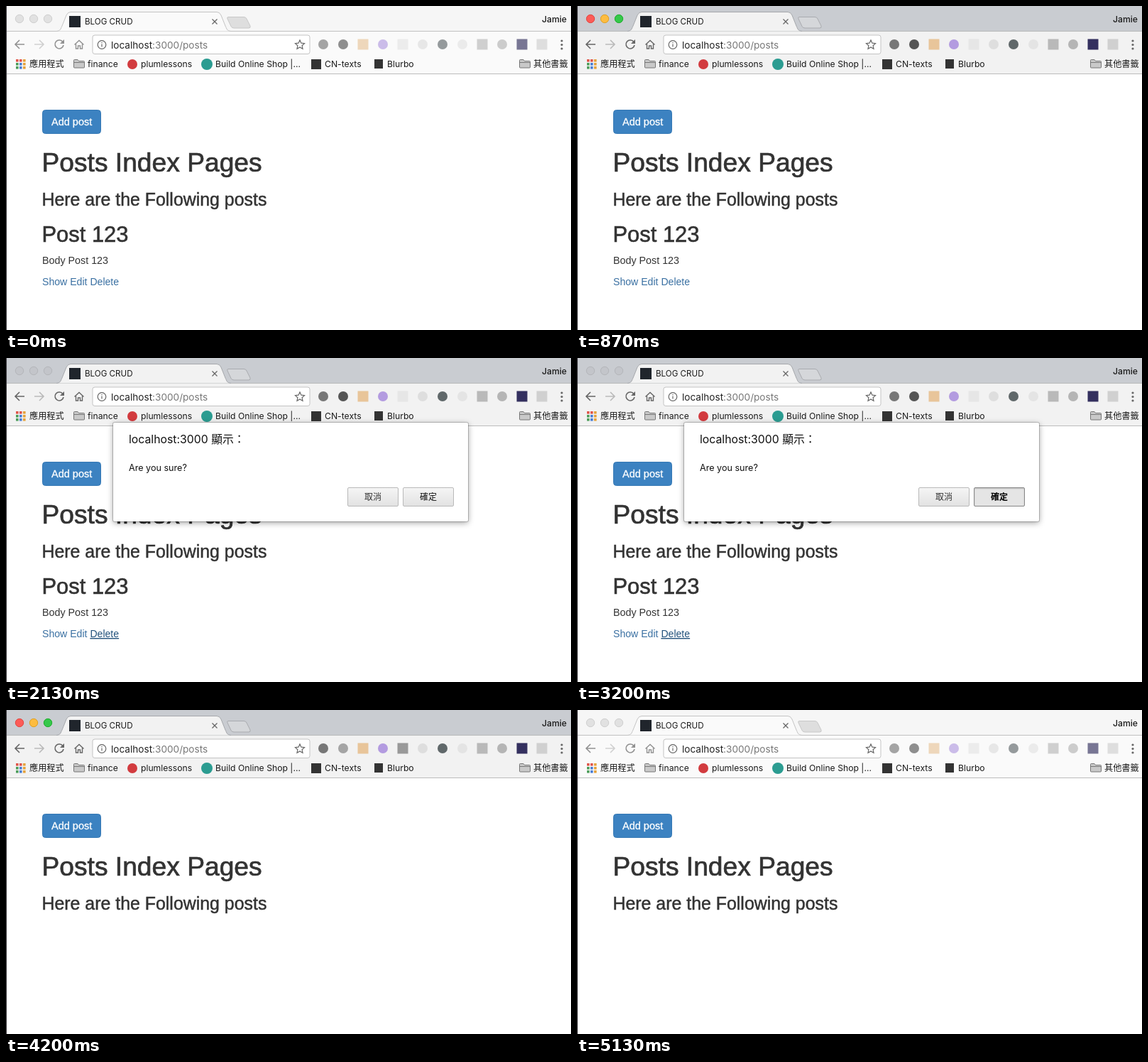
An HTML page for the animation above (5.19 s loop, 796 by 456 pixels).

```html
<!DOCTYPE html>
<html lang="zh-Hant">
<head>
<meta charset="utf-8">
<title>BLOG CRUD</title>
<style>
html, body { margin: 0; width: 100%; height: 100%; overflow: hidden; background: #fff; }
#stage {
  position: relative; width: 796px; height: 456px; overflow: hidden;
  font-family: Inter, "Noto Sans CJK TC", "Noto Sans CJK", sans-serif;
}
svg { display: block; }
.ui { font-size: 12.2px; fill: #1a1a1a; }
.page { font-family: "Liberation Sans", Arial, sans-serif; fill: #333; }
.head { stroke: #333; stroke-width: .02em; }
.line { fill: none; stroke: #666; stroke-width: 1.6; }

/* window in the background */
#bar { fill: #f6f6f6; }
#tab, #tools { fill: #fafafa; }
#tab { stroke: #c4c4c4; }
#plus { fill: #dedede; stroke: #c8c8c8; }
#lights circle { fill: #e1e1e1; stroke: #cfcfcf; }
#nav { opacity: .7; }
#exts { opacity: .65; }

/* window in front */
.active #bar { fill: #c9ccd1; }
.active #tab, .active #tools { fill: #f2f2f2; }
.active #tab { stroke: #a6a8ac; }
.active #plus { fill: #d5d7da; stroke: #a9abaf; }
.active #lights circle { fill: #c3c5ca; stroke: #b4b6ba; }
.active #nav, .active #exts { opacity: 1; }
.lit #lights .r { fill: #fc5b57; stroke: #e2463f; }
.lit #lights .y { fill: #fdbc40; stroke: #dfa023; }
.lit #lights .g { fill: #35c84a; stroke: #1dad2b; }

.link { fill: #3a70a2; }
.hover #del { fill: #23527c; text-decoration: underline; }
.gone #post { display: none; }
.loading .dims { opacity: .5; }
.loading .shows { fill: #999; }

#dialog {
  position: absolute; left: 151px; top: 91px; width: 500px; height: 139px;
  background: #fff; border-radius: 2px; color: #111;
  box-shadow: 0 0 0 1px rgba(0,0,0,.2), 0 2px 9px rgba(0,0,0,.38);
  transform-origin: 50% 100%;
}
#dialog span { position: absolute; left: 22px; white-space: nowrap; }
#dialog b {
  position: absolute; top: 91px; width: 70px; height: 25px; line-height: 26px;
  border: 1px solid #b9b9b9; border-radius: 2px; text-align: center;
  font-size: 12px; font-weight: 400; color: #333;
  background: linear-gradient(#f5f5f5, #e2e2e2);
}
#dialog #ok { left: 408px; font-weight: 500; color: #111; }
.pressed #dialog #ok {
  font-weight: 700; color: #000; border-color: #888;
  background: #e5e5e5; box-shadow: inset 0 1px 2px rgba(0,0,0,.2);
}
</style>
</head>
<body>
<div id="stage">
<svg width="796" height="456">
  <rect width="796" height="456" fill="#fff"/>
  <rect id="bar" width="796" height="36"/>
  <rect id="tools" y="36" width="796" height="60"/>
  <path d="M0 95.5H796" stroke="#bcbcbc"/>
  <path d="M0 35.5H796" stroke="#b5b5b5" opacity=".8"/>
  <path id="tab" d="M71 35.5C77 35 77 32 79 28L85 13Q87 8.500 91 8.500H297Q301 8.500 303 13L309 28C311 32 311 35 317 35.5"/>
  <path id="plus" d="M313 15.500H335Q338 15.500 339 18L344 28Q345 31 342 31H321Q318 31 317 28.500L312 18Q311 15.500 313 15.500Z"/>
  <g id="lights">
    <circle class="r" cx="19" cy="18" r="5.700"/>
    <circle class="y" cx="39" cy="18" r="5.700"/>
    <circle class="g" cx="59" cy="18" r="5.700"/>
  </g>
  <rect x="89" y="14" width="16" height="16" fill="#20252c"/>
  <text x="111" y="26" font-size="11.600" fill="#1a1a1a">BLOG CRUD</text>
  <path class="line" d="M290.500 18.500l7 7m0-7l-7 7" style="stroke-width:1.3"/>
  <text class="ui" x="755" y="23" font-weight="500">Jamie</text>

  <g id="nav">
    <path class="line" d="M26 54H13m6-6l-6 6l6 6"/>
    <path class="line" d="M40 54H53m-6-6l6 6l-6 6" opacity=".4"/>
    <path class="line" d="M80 50.500A6 6 0 1 0 81 55"/>
    <path d="M82 47v6h-6z" fill="#666"/>
    <path class="line" d="M96.500 54.500l6.500-6l6.500 6M98.500 53.500V60h3v-4h3v4h3v-6.500" style="stroke-width:1.4"/>
  </g>
  <rect x="122" y="41" width="306" height="26.500" rx="3" fill="#fff" stroke="#c3c3c3"/>
  <g class="line" style="stroke-width:1.2">
    <circle cx="135" cy="54.500" r="5.800"/>
    <path d="M135 53.500v4m0-6.500v1.300"/>
    <path d="M414 48l1.900 4.200 4.600.5-3.400 3.100.9 4.500-4-2.300-4 2.300.9-4.500-3.400-3.100 4.600-.5z"/>
  </g>
  <text x="148" y="59.500" font-size="13.6" fill="#222">localhost<tspan fill="#777">:3000/posts</tspan></text>
  <g id="exts"></g>
  <g fill="#666">
    <circle cx="783" cy="49" r="1.600"/><circle cx="783" cy="54.500" r="1.600"/><circle cx="783" cy="60" r="1.600"/>
  </g>

  <g id="apps"></g>
  <g id="folder" fill="#c9c9c9" stroke="#777">
    <path d="M95.500 86V76.500Q95.500 75.500 96.500 75.500H101l1.500 2H109.500Q110.500 77.500 110.500 78.500V86Q110.500 87 109.500 87H96.500Q95.500 87 95.500 86Z"/>
    <path d="M95.500 79.500H110.500" fill="none"/>
  </g>
  <use href="#folder" x="628"/>
  <circle cx="178" cy="82" r="7" fill="#d23b3f"/>
  <circle cx="283" cy="82" r="8" fill="#2b9c91"/>
  <rect x="430" y="75" width="14" height="14" fill="#333"/>
  <rect x="519" y="75" width="12" height="13" fill="#333"/>
  <g class="ui">
    <text x="33" y="86">應用程式</text>
    <text x="115" y="86">finance</text>
    <text x="190" y="86">plumlessons</text>
    <text x="295" y="86">Build Online Shop |...</text>
    <text x="449" y="86">CN-texts</text>
    <text x="537" y="86">Blurbo</text>
    <text x="743" y="86">其他書籤</text>
  </g>

  <rect x="51.500" y="146.500" width="82" height="33" rx="4" fill="#3c82c1" stroke="#3578b5"/>
  <g class="page">
    <text x="64" y="168" font-size="14.5" fill="#fff" stroke="#fff" stroke-width=".3">Add post</text>
    <text class="head" x="50.500" y="233" font-size="37.200">Posts Index Pages</text>
    <text class="head" x="50.500" y="281" font-size="24.900">Here are the Following posts</text>
    <g id="post">
      <text class="head" x="50.500" y="332" font-size="30.900">Post 123</text>
      <text x="51" y="363" font-size="14.300">Body Post 123</text>
      <text class="link" x="51" y="393" font-size="14.100">Show Edit <tspan id="del">Delete</tspan></text>
    </g>
  </g>
  <rect width="1" height="456" fill="#3a373c"/>
</svg>
<div id="dialog">
  <span style="top:14px;font-size:15.8px;line-height:20px">localhost:3000 顯示：</span>
  <span style="top:55px;font-size:12.6px;line-height:17px">Are you sure?</span>
  <b style="left:330px">取消</b><b id="ok">確定</b>
</div>
</div>
<script>
const LOOP = 5190, STEP = 200 / 3;
const $ = id => document.getElementById(id);
const stage = $('stage'), dialog = $('dialog');

// toolbar marks: colour, shape, extra class
const marks = [
  ['#777', 'o'], ['#555', 'o', 'dims'], ['#e8c59a', 's'], ['#b39be0', 'o'],
  ['#e6e6e6', 's', 'shows'], ['#dedede', 'o'], ['#60686a', 'o'], ['#e4e4e4', 'o'],
  ['#b9b9b9', 's'], ['#b5b5b5', 'o'], ['#34305f', 's'], ['#d0d0d0', 's']
];
$('exts').innerHTML = marks.map(([fill, shape, cls = ''], i) => {
  const x = 447 + 28 * i;
  return shape === 'o'
    ? `<circle class="${cls}" cx="${x}" cy="54" r="7" fill="${fill}"/>`
    : `<rect class="${cls}" x="${x - 7.5}" y="46.5" width="15" height="15" fill="${fill}"/>`;
}).join('');

const dots = ['#e0564a', '#e0564a', '#e5a23c', '#4d9e5b', '#4a7fd4', '#e5a23c', '#4d9e5b', '#4a7fd4', '#e5a23c'];
$('apps').innerHTML = dots.map((fill, i) =>
  `<rect x="${14 + i % 3 * 5}" y="${75 + Math.floor(i / 3) * 5}" width="3.6" height="3.6" fill="${fill}"/>`).join('');

function draw() {
  const n = Math.floor((performance.now() % LOOP + 4) / STEP);
  const during = (from, to) => n >= from && n < to;
  const states = {
    active: during(11, 74),
    lit: during(11, 24) || during(50, 74),
    hover: during(18, 52),
    pressed: during(47, 49),
    gone: n >= 58,
    loading: during(58, 67)
  };
  for (const name in states) stage.classList.toggle(name, states[name]);

  // the sheet swings down into place, then fades away
  const tilt = n === 25 ? .45 : n === 26 ? .1 : 0;
  dialog.style.display = during(25, 50) ? 'block' : 'none';
  dialog.style.opacity = n === 49 ? .5 : 1 - tilt;
  dialog.style.transform = tilt
    ? `translateY(${-23.5 * tilt}px) perspective(800px) rotateX(${23 * tilt}deg) scaleY(${1 + .1 * tilt})`
    : 'none';
  requestAnimationFrame(draw);
}
draw();
</script>
</body>
</html>
```
